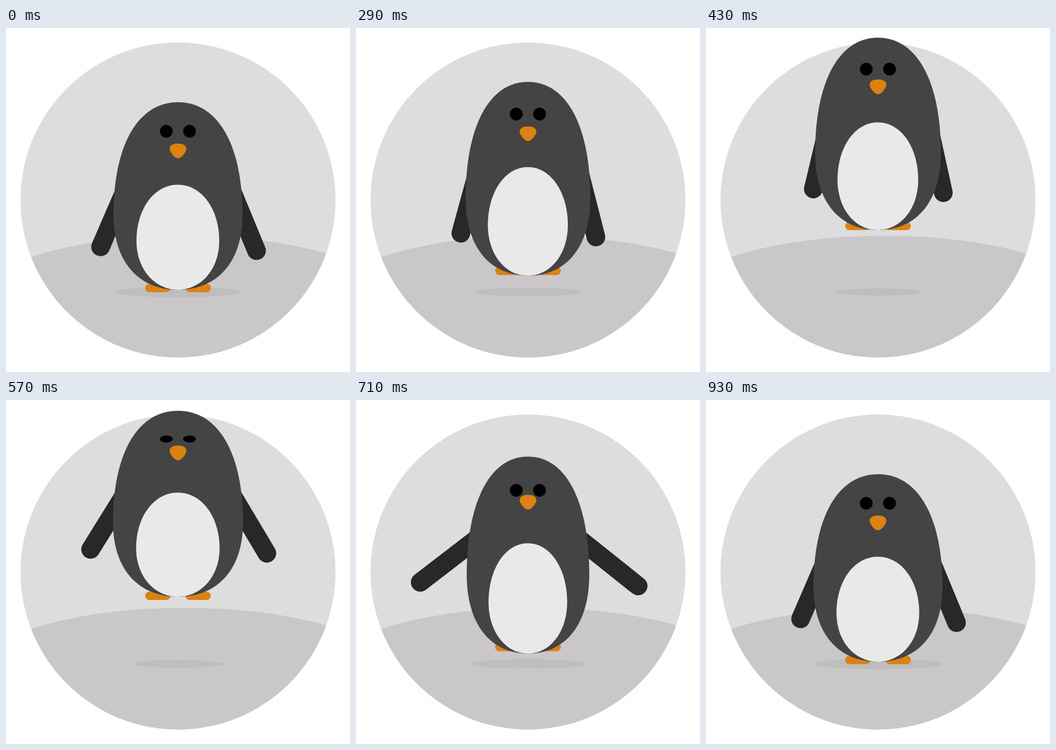
These frames come from a looping animation (640x640 px, 1070 ms). An HTML page:

```html
<!DOCTYPE html>
<html lang="en">
<head>
<meta charset="utf-8">
<title>Jumping penguin</title>
<style>
  html, body { margin: 0; width: 100%; height: 100%; overflow: hidden; background: #fff; }
  svg { display: block; width: 100vw; height: 100vh; }
</style>
</head>
<body>
<svg viewBox="0 0 640 640">
  <defs><clipPath id="disc"><circle cx="320" cy="320" r="293"/></clipPath></defs>
  <circle cx="320" cy="320" r="293" fill="#ddd"/>
  <ellipse cx="332" cy="518.9" rx="400" ry="132.4" fill="#c9c7ca" clip-path="url(#disc)"/>
  <rect x="160" y="518" width="320" height="95" fill="#c9c7ca" clip-path="url(#disc)"/>
  <ellipse id="shadow" cx="320.7" fill="#bebebe"/>
  <!-- y = 0 is the sole of the feet -->
  <g id="penguin">
    <g stroke="#282828" stroke-width="34.8" stroke-linecap="round">
      <line id="wingL" x1="232.8" y1="-215.6" x2="232.8" y2="-72.6"/>
      <line id="wingR" x1="410" y1="-213.2" x2="410" y2="-66.2"/>
    </g>
    <g fill="#dd8112">
      <rect x="259" y="-15.5" width="47" height="15.5" rx="7.5"/>
      <rect x="334" y="-15.5" width="47" height="15.5" rx="7.5"/>
    </g>
    <g id="body">
      <path id="coat" fill="#444"/>
      <path id="belly" fill="#e9e9e9"/>
    </g>
    <ellipse class="eye" cx="298.2" cy="-299.4" rx="11.9"/>
    <ellipse class="eye" cx="341.5" cy="-299.4" rx="11.9"/>
    <path id="beak" fill="#dd8112" d="M304.5 10C304.5 3 311 0 320 0S335.5 3 335.5 10C335.5 15 327 27.5 320 27.5S304.5 15 304.5 10Z"/>
  </g>
</svg>
<script>
  const LOOP = 1070, RATE = 14;

  // key points: [step, value], 14 steps per second
  const sole = [[1, 491.5], [3, 504.5], [4, 459.5], [6, 376], [7, 358], [8, 372], [9, 395], [10, 467.5], [12, 491.5]];
  const width = [[1, 240], [3, 245], [4, 232], [6, 234], [8, 242], [10, 228], [12, 240]];
  const swing = [[1, 23.4], [3, 19.3], [4, 15.3], [6, 13.4], [8, 31.8], [10, 52.4], [13, 23.4]];
  const beak = [[4, -276.5], [10, -291], [13, -276.5]];
  const shade = [[1, 237], [3, 215], [6, 163], [8, 169], [10, 211], [13, 237]];
  const shadeY = [[1, 491], [3, 508.5], [4, 491]];

  // smooth curve through the key points, at rest at both ends
  function curve(keys, n) {
    const last = keys.length - 1;
    if (n <= keys[0][0]) return keys[0][1];
    if (n >= keys[last][0]) return keys[last][1];
    const i = keys.findIndex(k => k[0] > n) - 1;
    const slope = j => j === 0 || j === last ? 0
      : (keys[j + 1][1] - keys[j - 1][1]) / (keys[j + 1][0] - keys[j - 1][0]);
    const [x0, a] = keys[i], [x1, b] = keys[i + 1];
    const d = x1 - x0, u = (n - x0) / d, s = u * u * (3 - 2 * u);
    return a + (b - a) * s + d * u * (1 - u) * (slope(i) * (1 - u) - slope(i + 1) * u);
  }

  // egg widest at y; k sets how full its curves are
  function egg(x, y, r, up, down, k) {
    const side = (dir, from, to) => `C${x + dir * r} ${y + from * k} ${x + dir * r * k} ${y + from} ${x} ${y + from}`
      + `C${x - dir * r * k} ${y + from} ${x - dir * r} ${y + from * k} ${x - dir * r} ${y}`;
    return `M${x - r} ${y}` + side(-1, -up) + side(1, down) + 'Z';
  }

  const el = id => document.getElementById(id);
  const set = (node, name, value) => node.setAttribute(name, value);
  const eyes = document.querySelectorAll('.eye');
  set(el('coat'), 'd', egg(0, 35, 120, 209.5, 139.5, 0.62));
  set(el('belly'), 'd', egg(-0.3, 83.5, 77, 104.5, 91, 0.57));

  function draw(n) {
    const w = curve(width, n), angle = curve(swing, n), shadow = curve(shade, n);
    const blink = Math.min(1, 0.55 + 0.45 * Math.abs(n - 8));
    set(el('penguin'), 'transform', `translate(0 ${curve(sole, n)})`);
    set(el('body'), 'transform', `translate(320 -179) scale(${w / 240} ${1 + (240 - w) * 0.0042})`);
    set(el('wingL'), 'transform', `rotate(${angle} 232.8 -215.6)`);
    set(el('wingR'), 'transform', `rotate(${1 - angle} 410 -213.2)`);
    set(el('beak'), 'transform', `translate(0 ${curve(beak, n)})`);
    eyes.forEach(e => set(e, 'ry', 11.9 * blink));
    set(el('shadow'), 'rx', shadow / 2);
    set(el('shadow'), 'ry', shadow * 0.042);
    set(el('shadow'), 'cy', curve(shadeY, n));
  }

  // each step begins on a whole 10 ms
  const stepStart = n => Math.round(n * 100 / RATE) * 10;

  const start = performance.now();
  function tick() {
    const t = (performance.now() - start) % LOOP;
    let n = 0;
    while (n < 13 && stepStart(n + 1) <= t) n++;
    draw(n);
    requestAnimationFrame(tick);
  }
  tick();
</script>
</body>
</html>
```
